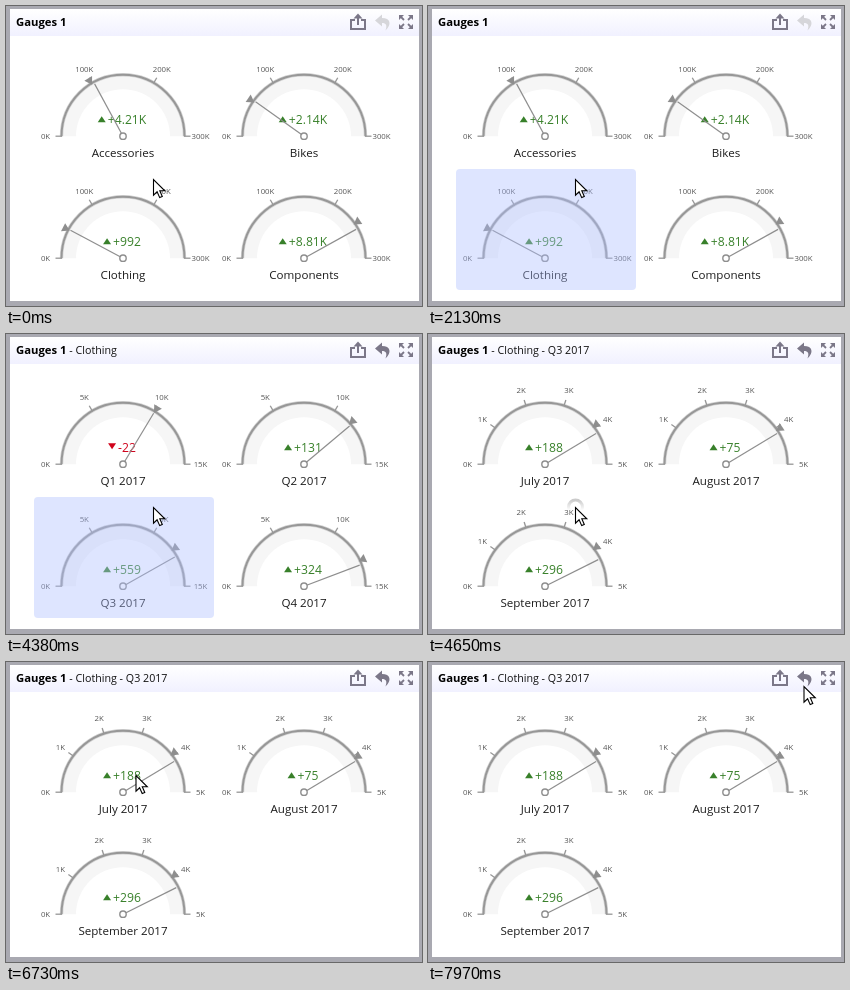
These frames come from a looping animation (416x300 px, 8 s). An HTML page with a canvas:

```html
<!DOCTYPE html>
<html lang="en">
<head>
<meta charset="utf-8">
<title>Gauges</title>
<style>
  html, body { margin: 0; width: 100%; height: 100%; overflow: hidden; }
  canvas { display: block; }
</style>
</head>
<body>
<canvas id="stage" width="416" height="300"></canvas>
<script>
const ctx = document.getElementById('stage').getContext('2d');
const LOOP = 8000, FONT = '"Open Sans", "Noto Sans", sans-serif';
const GRAY = '#979797', DARK_GRAY = '#8e8e8e', ICON = '#7b7788';
const GREEN = '#38802a', RED = '#d0021b';
const CLICK_TIME = 630, CLICKS = [2160, 4410];

// Gauges: [caption, variation text, variation amount, needle degrees from the left end]
const LEVELS = [
  { start: 0, path: '', max: 300e3, step: 100e3, gauges: [
    ['Accessories', '+4.21K', 4210, 61.5], ['Bikes', '+2.14K', 2140, 35.5],
    ['Clothing', '+992', 992, 28], ['Components', '+8.81K', 8810, 151]] },
  { start: 2370, path: ' - Clothing', max: 15e3, step: 5e3, gauges: [
    ['Q1 2017', '-22', -22, 121], ['Q2 2017', '+131', 131, 140],
    ['Q3 2017', '+559', 559, 150.5], ['Q4 2017', '+324', 324, 159.3]] },
  { start: 4590, path: ' - Clothing - Q3 2017', max: 5e3, step: 1e3, gauges: [
    ['July 2017', '+188', 188, 149], ['August 2017', '+75', 75, 149],
    ['September 2017', '+296', 296, 153.5]] }
];

// Cursor keys: [time, x, y]
const CURSOR = [
  [0, 147.5, 173], [5740, 147.5, 173], [6070, 130, 113], [6730, 130, 113],
  [6980, 111, 105], [7250, 185, 90], [7450, 269, 65], [7510, 291.5, 56],
  [7700, 343.5, 38], [7970, 376, 24], [8000, 376, 24]
];

// Monotone cubic interpolation: rests stay still and moves never overshoot.
function cursorAt(time, axis) {
  const slope = i => {
    const a = CURSOR[i], b = CURSOR[i + 1];
    return a && b ? (b[axis] - a[axis]) / (b[0] - a[0]) : 0;
  };
  const tangent = i => {
    const p = slope(i - 1), q = slope(i);
    return p * q > 0 ? 2 * p * q / (p + q) : 0;
  };
  const i = CURSOR.findIndex((key, n) => n === CURSOR.length - 2 || time < CURSOR[n + 1][0]);
  const [a, b] = [CURSOR[i], CURSOR[i + 1]];
  const span = b[0] - a[0], u = (time - a[0]) / span, v = 1 - u;
  return a[axis] * v * v * (1 + 2 * u) + b[axis] * u * u * (3 - 2 * u)
    + span * u * v * (tangent(i) * v - tangent(i + 1) * u);
}

function rect(color, x, y, w, h) {
  ctx.fillStyle = color;
  ctx.fillRect(x, y, w, h);
}

function verticalFade(top, bottom, from, to) {
  const fade = ctx.createLinearGradient(0, top, 0, bottom);
  fade.addColorStop(0, from);
  fade.addColorStop(1, to);
  return fade;
}

function text(value, x, y, size, color, align = 'center', weight = 400) {
  ctx.font = `${weight} ${size}px ${FONT}`;
  ctx.textAlign = align;
  ctx.fillStyle = color;
  ctx.fillText(value, x, y);
  return ctx.measureText(value).width;
}

function shape(d, fill, stroke, width = 1) {
  const path = new Path2D(d);
  if (fill) { ctx.fillStyle = fill; ctx.fill(path); }
  if (stroke) { ctx.strokeStyle = stroke; ctx.lineWidth = width; ctx.stroke(path); }
}

// Runs draw with the left end of the scale on the negative x axis.
function turned(degrees, draw) {
  ctx.save();
  ctx.rotate(degrees * Math.PI / 180);
  draw();
  ctx.restore();
}

function drawVariation(label, amount) {
  const color = amount < 0 ? RED : GREEN, size = 12.2;
  ctx.font = `${size}px ${FONT}`;
  const left = -1 - (ctx.measureText(label).width + 10) / 2;
  const [base, tip] = amount < 0 ? [-21, -15] : [-14, -20];
  shape(`M${left} ${base}h8L${left + 4} ${tip}z`, color);
  text(label, left + 10, -12, size, color, 'left');
}

function drawGauge(cx, cy, { max, step }, [caption, label, amount, degrees]) {
  const arc = 'M-61.5 0A61.5 61.5 0 0 1 61.5 0';
  ctx.save();
  ctx.translate(cx, cy + .2);
  shape('M-60 0A60 60 0 0 1 60 0H47A47 47 0 0 0-47 0z', '#f6f6f6');
  shape(arc, null, '#d2d2d2', 3.4);
  shape(arc, null, GRAY, 1.9);
  for (let value = 0; value <= max; value += step) {
    const scale = value / max * 180, rad = scale * Math.PI / 180;
    turned(scale, () => shape('M-67.5 0H-61', null, GRAY, 1.3));
    text(value / 1000 + 'K', -77.5 * Math.cos(rad), 3 - 77.5 * Math.sin(rad), 7.8, '#555');
  }
  drawVariation(label, amount);
  turned(degrees, () => shape('M0 0H-59.5', null, DARK_GRAY, 1.2));
  turned(degrees - amount / max * 180, () => shape('M-60 0L-67.5-4.5V4.5z', DARK_GRAY));
  shape('M3.2 0A3.2 3.2 0 1 1-3.2 0A3.2 3.2 0 1 1 3.2 0z', '#fff', DARK_GRAY, 1.4);
  text(caption, 0, 20.8, 11.6, '#1c1c1c');
  ctx.restore();
}

function drawWindow(path) {
  rect('#a9a9b1', 0, 0, 416, 300);
  rect('#fff', 4, 3, 409, 292);
  rect(verticalFade(3, 30, '#fff', '#f1f1ff'), 4, 3, 409, 27);
  const width = text('Gauges 1', 10, 20, 11.3, '#000', 'left', 700);
  text(path, 10 + width, 20, 10.7, '#111', 'left');

  shape('M349 14H345V23H359V14H355M352 19V11', null, ICON, 2);
  shape('M352 7.5L356.5 12.5H347.5z', ICON);
  shape('M369 14.5L376 8.5V12C384.5 12 386 18.5 379.5 24.5C381.5 19 380 17 376 17V20.5z',
    path ? ICON : '#d6d6da');
  for (const [sx, sy] of [[1, 1], [-1, 1], [1, -1], [-1, -1]]) {
    ctx.save();
    ctx.translate(400, 16);
    ctx.scale(sx, sy);
    shape('M7 7H2L7 2z', ICON);
    shape('M2 2L6 6', null, ICON, 1.8);
    ctx.restore();
  }
}

function drawClick(progress, x, y) {
  const radius = 2 + 13 * progress, alpha = .65 * (1 - progress);
  ctx.strokeStyle = verticalFade(y - radius, y + radius / 2,
    `rgba(125,125,125,${alpha})`, 'rgba(125,125,125,0)');
  ctx.lineWidth = 3;
  ctx.beginPath();
  ctx.arc(x, y, radius, 0, 2 * Math.PI);
  ctx.stroke();
}

function drawCursor(x, y) {
  ctx.save();
  ctx.translate(x, y);
  shape('M0 .5V16.2L3.6 12.8L6.2 18.6L8.8 17.5L6.3 11.8H11.3z', '#fff', '#000', 1.1);
  ctx.restore();
}

function draw(time) {
  const level = LEVELS.findLast(item => time >= item.start);
  drawWindow(level.path);
  level.gauges.forEach((gauge, i) =>
    drawGauge(117 + 181 * (i % 2), 130 + 122 * (i >> 1), level, gauge));

  if (time >= 130 && time < LEVELS[2].start) {
    ctx.fillStyle = 'rgba(172,190,255,.4)';
    ctx.beginPath();
    ctx.roundRect(28, 163, 180, 121, 4);
    ctx.fill();
  }

  const x = cursorAt(time, 1), y = cursorAt(time, 2);
  for (const start of CLICKS) {
    const progress = (time - start) / CLICK_TIME;
    if (progress > 0 && progress < 1) drawClick(progress, x, y);
  }
  drawCursor(x, y);
}

const began = performance.now();
function tick() {
  draw((performance.now() - began) % LOOP);
  requestAnimationFrame(tick);
}
tick();
</script>
</body>
</html>
```
